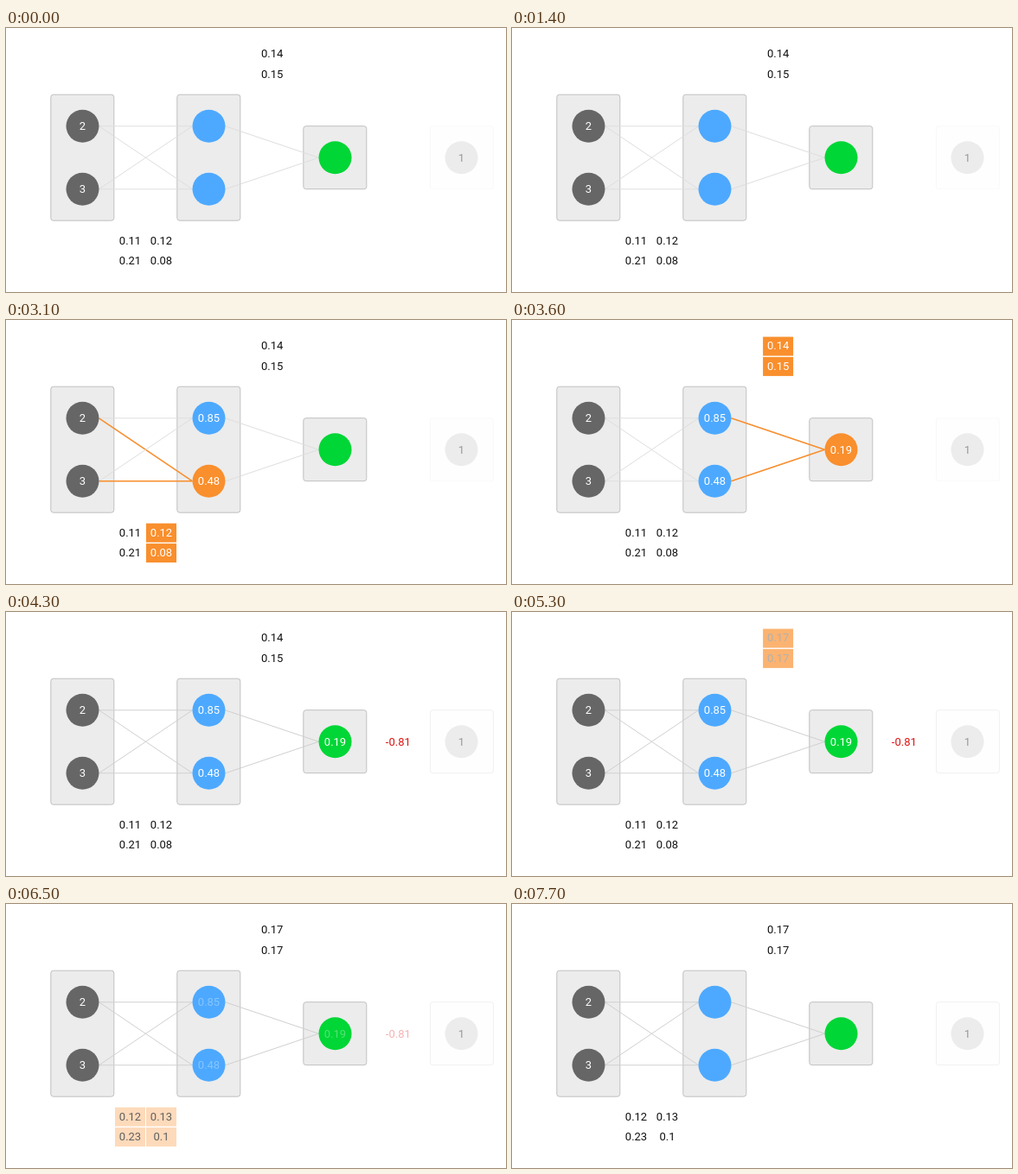
These frames come from a looping animation (578 px wide and 306 px high, 8 s). An HTML page with a canvas:

```html
<!DOCTYPE html>
<html lang="en">
<head>
<meta charset="utf-8">
<title>Neural network training step</title>
<style>
  html, body { margin: 0; width: 100%; height: 100%; overflow: hidden; background: #fff; }
  canvas { display: block; width: 578px; height: 306px; }
</style>
</head>
<body>
<canvas id="stage"></canvas>
<script>
const WIDTH = 578, HEIGHT = 306, LOOP = 8000, FADE = 150;
const RADIUS = 19;
const ORANGE = [249, 143, 45], BLUE = [77, 169, 255], GREEN = [0, 214, 54];
const DARK = [102, 102, 102], PALE = [236, 236, 236];
const BLACK = [17, 17, 17], WHITE = [255, 255, 255];

// Start times of the steps, in ms.
const STEP = { top: 2200, bottom: 2800, output: 3400, error: 4000,
               outWeights: 5200, inWeights: 5800, reset: 6400 };

const canvas = document.getElementById('stage');
const ctx = canvas.getContext('2d');
const ratio = window.devicePixelRatio || 1;
canvas.width = WIDTH * ratio;
canvas.height = HEIGHT * ratio;

const clamp = v => Math.max(0, Math.min(1, v));
const since = (t, start) => clamp((t - start) / FADE);
const during = (t, start, end) => since(t, start) * (1 - since(t, end));
const mix = (a, b, k) => a.map((v, i) => v + (b[i] - v) * k);
const css = (rgb, alpha = 1) => `rgba(${rgb.map(Math.round).join(',')},${alpha})`;

function label(text, x, y, color, alpha = 1) {
  if (!alpha) return;
  ctx.fillStyle = css(color, alpha);
  ctx.fillText(text, x, y + 4.4);
}

function panel(x, y, h, fill, stroke) {
  ctx.beginPath();
  ctx.roundRect(x, y, 73, h, 3);
  ctx.fillStyle = fill;
  ctx.fill();
  ctx.lineWidth = 1;
  ctx.strokeStyle = stroke;
  ctx.stroke();
}

function link(from, to, glow, gray) {
  const stroke = (style, width) => {
    ctx.beginPath();
    ctx.moveTo(from[0] + RADIUS, from[1]);
    ctx.lineTo(to[0] - RADIUS, to[1]);
    ctx.lineWidth = width;
    ctx.strokeStyle = style;
    ctx.stroke();
  };
  stroke(css([gray, gray, gray]), 1);
  if (glow) stroke(css(ORANGE, glow), 1.6);
}

function node([x, y], color, text, textColor = WHITE, alpha = 1) {
  ctx.beginPath();
  ctx.arc(x, y, RADIUS, 0, 2 * Math.PI);
  ctx.fillStyle = css(color);
  ctx.fill();
  label(text, x, y, textColor, alpha);
}

function weight(text, x, y, glow) {
  if (glow) {
    ctx.fillStyle = css(ORANGE, glow);
    ctx.fillRect(x - 17.5, y - 10.5, 35, 22);
  }
  label(text, x, y, mix(BLACK, WHITE, glow));
}

function draw(t) {
  ctx.setTransform(ratio, 0, 0, ratio, 0, 0);
  ctx.fillStyle = '#fff';
  ctx.fillRect(0, 0, WIDTH, HEIGHT);
  ctx.font = '13px Roboto, sans-serif';
  ctx.textAlign = 'center';

  const inputs = [[88.5, 113.8], [88.5, 186.8]];
  const hidden = [[234.5, 113.8], [234.5, 186.8]];
  const output = [380.5, 150.3], goal = [526.5, 150.3];

  const hiddenGlow = [during(t, STEP.top, STEP.bottom), during(t, STEP.bottom, STEP.output)];
  const outputGlow = during(t, STEP.output, STEP.error);
  const outUpdate = during(t, STEP.outWeights, STEP.inWeights);
  const inUpdate = during(t, STEP.inWeights, STEP.reset);
  const shown = start => during(t, start, STEP.reset);
  const settled = since(t, STEP.error);

  panel(51.8, 77.2, 146, '#ececec', '#c0c0c0');
  panel(197.8, 77.2, 146, '#ececec', '#c0c0c0');
  panel(343.8, 113.7, 73, '#ececec', '#c0c0c0');
  panel(490.4, 113.7, 73, '#fefefe', css([240, 240, 240], 0.4 + 0.6 * settled));

  const gray = 222 - 14 * settled;
  inputs.forEach(from => hidden.forEach((to, i) => link(from, to, hiddenGlow[i], gray)));
  hidden.forEach(from => link(from, output, outputGlow, gray));

  inputs.forEach((at, i) => node(at, DARK, ['2', '3'][i]));
  hidden.forEach((at, i) => node(at, mix(BLUE, ORANGE, hiddenGlow[i]),
    ['0.85', '0.48'][i], WHITE, shown([STEP.top, STEP.bottom][i])));
  node(output, mix(GREEN, ORANGE, outputGlow), '0.19', WHITE, shown(STEP.output));
  node(goal, PALE, '1', [153, 153, 153]);
  label('-0.81', 453.3, 150.3, [221, 17, 17], shown(STEP.error));

  const outValues = t < STEP.outWeights ? ['0.14', '0.15'] : ['0.17', '0.17'];
  outValues.forEach((text, i) =>
    weight(text, 307.6, 30 + 23.4 * i, Math.max(outputGlow, outUpdate)));

  const inValues = t < STEP.inWeights
    ? ['0.11', '0.12', '0.21', '0.08'] : ['0.12', '0.13', '0.23', '0.1'];
  inValues.forEach((text, i) => {
    const column = i % 2, row = i >> 1;
    weight(text, 143.5 + 36 * column, 246.2 + 23.4 * row, Math.max(hiddenGlow[column], inUpdate));
  });
}

const begin = performance.now();
function tick() {
  draw((performance.now() - begin) % LOOP);
  requestAnimationFrame(tick);
}
tick();
</script>
</body>
</html>
```
